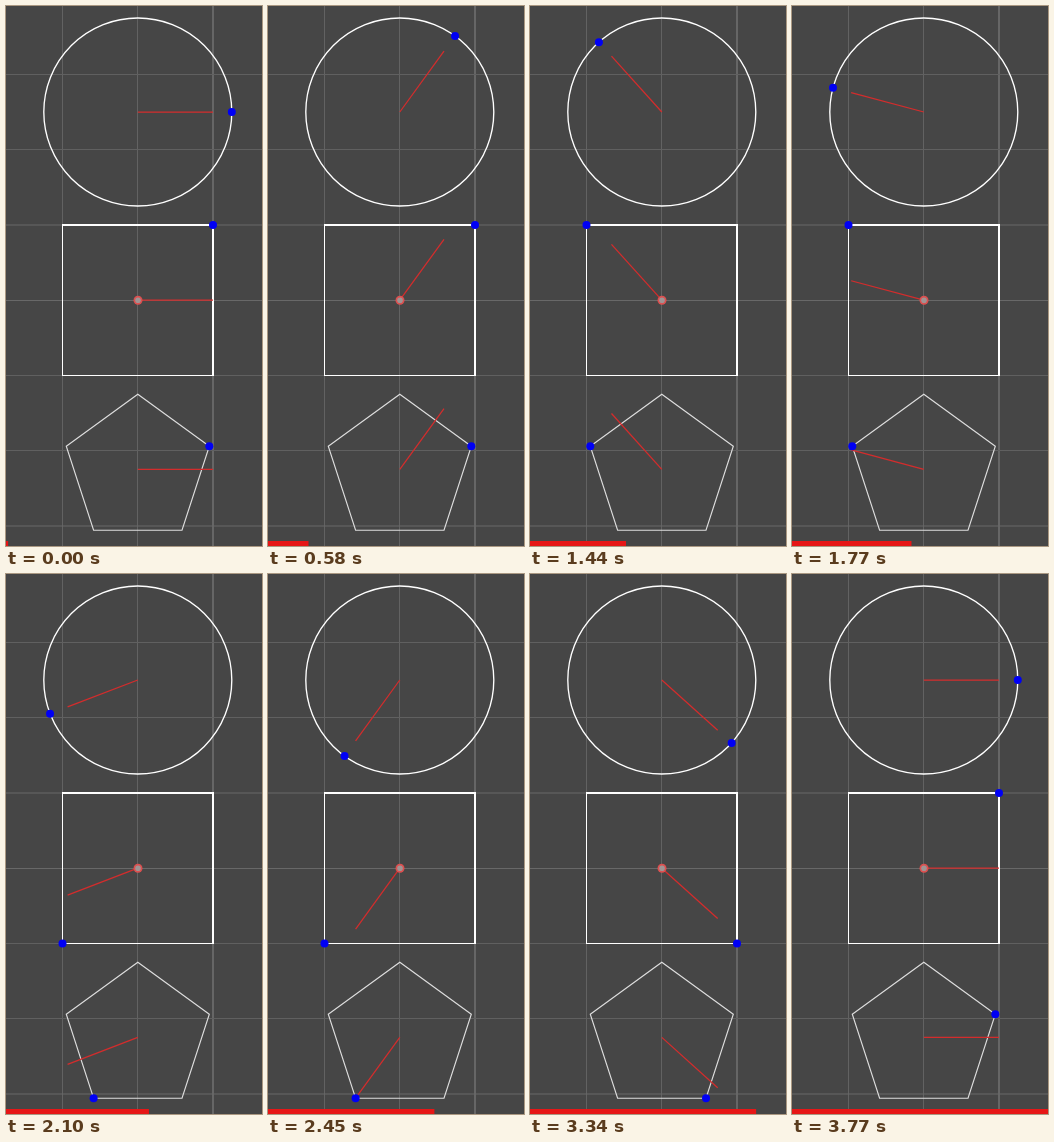
Animation of 256 by 540 pixels, one loop 3.8 s. Source, as an HTML page with a canvas:

```html
<!DOCTYPE html>
<html lang="en">
<head>
<meta charset="utf-8">
<title>Nearest vertex</title>
<style>
  html, body { margin: 0; width: 100%; height: 100%; overflow: hidden; background: #464646; }
  canvas { display: block; }
</style>
</head>
<body>
<canvas id="stage" width="256" height="540"></canvas>
<script>
const ctx = document.getElementById('stage').getContext('2d');
const LOOP = 3800, STEPS = 120, UNIT = 75.2, CX = 131.8;
const CENTERS = { circle: 106, square: 294.2, pentagon: 463.4 };
const RADIUS = 94;

// Pacing of the steps: [time in ms, step reached]
const PACE = [[0, 0], [30, 1], [580, 18], [1110, 34], [1650, 51],
  [2200, 69], [2740, 86], [3280, 103], [LOOP, STEPS]];

function stepAt(t) {
  let i = PACE.length - 2;
  while (PACE[i][0] > t) i--;
  const [t0, s0] = PACE[i], [t1, s1] = PACE[i + 1];
  return Math.min(s1 - 1, s0 + Math.floor((t - t0) / (t1 - t0) * (s1 - s0) + 0.32));
}

function polar(cy, radius, degrees) {
  const a = degrees * Math.PI / 180;
  return [CX + radius * Math.cos(a), cy - radius * Math.sin(a)];
}

function line(x1, y1, x2, y2, color, width = 1) {
  ctx.strokeStyle = color;
  ctx.lineWidth = width;
  ctx.beginPath();
  ctx.moveTo(x1, y1);
  ctx.lineTo(x2, y2);
  ctx.stroke();
}

function disc(x, y, r, color) {
  ctx.fillStyle = color;
  ctx.beginPath();
  ctx.arc(x, y, r, 0, 2 * Math.PI);
  ctx.fill();
}

const pentagon = [18, 90, 162, 234, 306].map(a => polar(CENTERS.pentagon, UNIT, a));
const square = [[207, 219], [56.5, 219], [56.5, 369.5], [207, 369.5]];

// Index of the closest vertex; ties go to the earlier one
function nearest(angle, count, first) {
  const sector = 360 / count;
  return (Math.ceil((angle - first) / sector - 0.5) + count) % count;
}

function drawBackground() {
  ctx.fillStyle = '#464646';
  ctx.fillRect(0, 0, 256, 540);
  for (const x of [56.5, 131.5]) line(x, 0, x, 540, '#626262');
  line(207, 0, 207, 540, '#666', 2);
  for (const y of [68.5, 143.5, 369.5, 444.5]) line(0, y, 256, y, '#606060');
  for (const y of [219, 294.5, 520]) line(0, y, 256, y, '#686868', 1.2);
}

function drawShapes() {
  ctx.strokeStyle = '#fff';
  ctx.lineWidth = 1.35;
  ctx.beginPath();
  ctx.arc(CX, CENTERS.circle, RADIUS, 0, 2 * Math.PI);
  ctx.stroke();

  line(56, 219, 208, 219, '#fff', 2);
  line(207, 218, 207, 370, '#fff', 2);
  line(56.5, 218, 56.5, 370, '#fff');
  line(56, 369.5, 208, 369.5, '#fff');

  ctx.strokeStyle = '#dedede';
  ctx.lineWidth = 1.15;
  ctx.beginPath();
  pentagon.forEach(p => ctx.lineTo(...p));
  ctx.closePath();
  ctx.stroke();
}

function draw(t) {
  const step = stepAt(t);
  const angle = Math.round(step * STEPS / (STEPS - 1)) * 360 / STEPS;

  drawBackground();
  drawShapes();
  for (const cy of Object.values(CENTERS)) {
    line(CX, cy, ...polar(cy, UNIT, angle), '#d42c2c', 1.25);
  }
  disc(CX + 0.2, CENTERS.square, 4.5, '#dc5050');
  disc(CX + 0.2, CENTERS.square, 2.8, '#a09494');

  const picks = [
    polar(CENTERS.circle, RADIUS, angle),
    square[nearest(angle, 4, 45) % 4],
    pentagon[nearest(angle, 5, 18) % 5]
  ];
  // A full or empty turn belongs to the first corner of the square
  if (angle % 360 === 0) picks[1] = square[0];
  for (const [x, y] of picks) disc(x, y, 4, '#0000f4');

  ctx.fillStyle = '#e61616';
  ctx.fillRect(0, 535, 256 * (step + 1) / STEPS, 5);
}

function tick() {
  draw(performance.now() % LOOP);
  requestAnimationFrame(tick);
}
tick();
</script>
</body>
</html>
```
